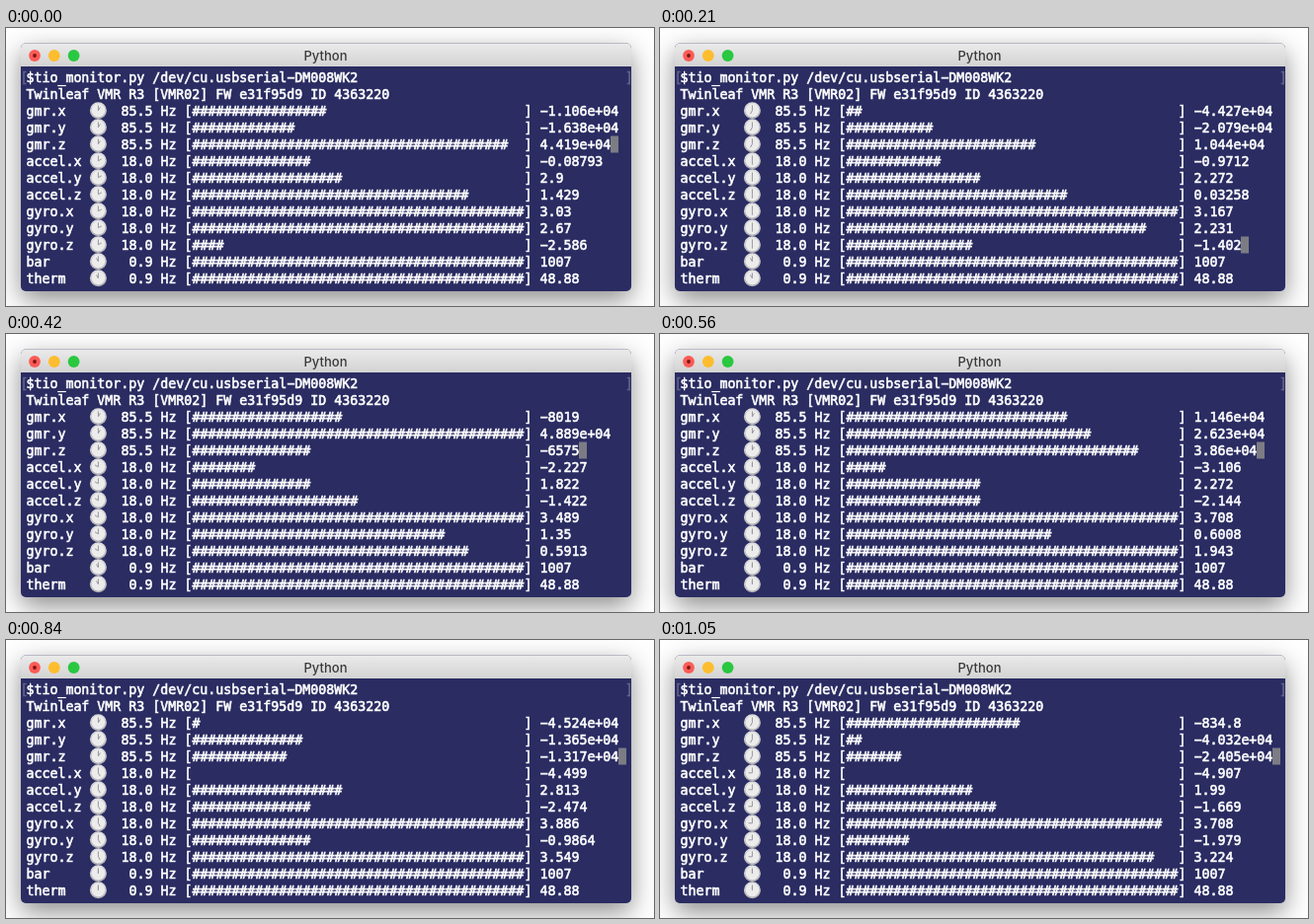
An HTML page with a canvas for the animation above (1120 ms loop, 656 by 282 pixels).

```html
<!DOCTYPE html>
<html lang="en">
<head>
<meta charset="utf-8">
<title>Sensor monitor</title>
<style>
html, body { margin: 0; width: 100%; height: 100%; overflow: hidden; background: #fff; }
canvas { display: block; width: 656px; height: 282px; }
</style>
</head>
<body>
<canvas id="stage"></canvas>
<script>
const W = 656, H = 282, STEP = 70, STEPS = 16;
const CELL = 8, LINE = 17, LEFT = 20.4, TOP = 42, FULL = 42;
const MONO = '13.29px "DejaVu Sans Mono", monospace';

const canvas = document.getElementById('stage');
const ctx = canvas.getContext('2d');
const dpr = window.devicePixelRatio || 1;
canvas.width = W * dpr;
canvas.height = H * dpr;
ctx.scale(dpr, dpr);

// Slow motion: a cosine around mid, highest at step peak
const wave = (mid, amp, peak, period) =>
  s => mid + amp * Math.cos(2 * Math.PI * (s - peak) / period);

// Fast, irregular field: straight lines between a few readings
const turns = [0, 3, 6, 8, 10, 12, 15];
const path = (...v) => s => {
  let i = 0;
  while (i < turns.length - 2 && s >= turns[i + 1]) i++;
  return v[i] + (v[i + 1] - v[i]) * (s - turns[i]) / (turns[i + 1] - turns[i]);
};

const fixed = v => () => v;
const sensor = (name, rate, lo, hi, read) => ({ name, rate, lo, hi, read });

const sensors = [
  sensor('gmr.x', 85.5, -49500, 41500,
    path(-11060, -44270, -8019, 11460, -34120, -45240, -834.8)),
  sensor('gmr.y', 85.5, -45900, 48800,
    path(-16380, -20790, 48890, 26230, -5946, -13650, -40320)),
  sensor('gmr.z', 85.5, -39750, 47750,
    path(44190, 10440, -6575, 38600, 34670, -13170, -24050)),
  sensor('accel.x', 18, -4.76, 7.59, wave(-2.36, 2.55, -2.7, 36)),
  sensor('accel.y', 18, -2.82, 9.53, wave(2.35, 0.55, 0, 11)),
  sensor('accel.z', 18, -5.63, 2.77, wave(-0.12, 2.43, -4.2, 30)),
  sensor('gyro.x', 18, -1.85, 3, wave(3.46, 0.43, 11.5, 23)),
  sensor('gyro.y', 18, -3.1, 2.66, wave(0, 2.7, -1, 42)),
  sensor('gyro.z', 18, -3.1, 1.25, wave(0.45, 3.15, 12.8, 28)),
  sensor('bar', 0.9, 0, 1007, fixed(1007)),
  sensor('therm', 0.9, 0, 48.88, fixed(48.88))
];

// The scale of each bar widens to hold every reading so far.
function barLength(q, s) {
  let { lo, hi } = q;
  for (let k = 0; k <= s; k++) {
    lo = Math.min(lo, q.read(k));
    hi = Math.max(hi, q.read(k));
  }
  return Math.floor(FULL * (q.read(s) - lo) / (hi - lo));
}

// Four significant digits, like printf's %.4g
function format(v) {
  if (Math.abs(v) < 9999.5) return String(parseFloat(v.toPrecision(4)));
  const [m, e] = v.toExponential(3).split('e+');
  return parseFloat(m) + 'e+' + e.padStart(2, '0');
}

function hourAt(rate, s) {
  if (rate < 1) return s < 7 ? 11 : 12;
  const start = rate > 50 ? 1 : 2;
  return Math.round(start + rate * s * STEP / 1000) % 12;
}

function disc(x, y, r, fill) {
  ctx.beginPath();
  ctx.arc(x, y, r, 0, Math.PI * 2);
  ctx.fillStyle = fill;
  ctx.fill();
}

function write(text, col, row, color = '#fff') {
  const x = LEFT + col * CELL, y = TOP + row * LINE + 13;
  const wide = text.replace(/-/g, '\u2212');
  ctx.font = MONO;
  ctx.textAlign = 'left';
  ctx.fillStyle = ctx.strokeStyle = color;
  ctx.lineWidth = 0.6;
  ctx.fillText(wide, x, y);
  ctx.strokeText(wide, x, y);
}

function hand(x, y, hour, len) {
  const a = hour * Math.PI / 6;
  ctx.beginPath();
  ctx.moveTo(x, y);
  ctx.lineTo(x + Math.sin(a) * len, y - Math.cos(a) * len);
  ctx.strokeStyle = '#97979b';
  ctx.lineWidth = 1;
  ctx.stroke();
}

function clock(row, hour) {
  const x = 93.4, y = TOP + row * LINE + 7.8;
  const rim = ctx.createLinearGradient(0, y - 8, 0, y + 8);
  rim.addColorStop(0, '#dedee0');
  rim.addColorStop(1, '#b0b0b4');
  disc(x, y, 8.5, rim);
  disc(x, y, 6.8, '#ececec');
  hand(x, y, 0, 5.4);
  hand(x, y, hour, 3.9);
}

function drawWindow() {
  ctx.fillStyle = '#fff';
  ctx.fillRect(0, 0, W, H);

  ctx.save();
  ctx.shadowColor = 'rgba(0,0,0,0.45)';
  ctx.shadowBlur = 26 * dpr;
  ctx.shadowOffsetY = 9 * dpr;
  ctx.beginPath();
  ctx.roundRect(15, 15.5, 618, 251.5, 5);
  ctx.fillStyle = '#2a2c62';
  ctx.fill();
  ctx.restore();

  const bar = ctx.createLinearGradient(0, 15, 0, 39);
  bar.addColorStop(0, '#ebebeb');
  bar.addColorStop(1, '#d3d3d3');
  ctx.beginPath();
  ctx.roundRect(15, 15.5, 618, 23.5, [5, 5, 0, 0]);
  ctx.fillStyle = bar;
  ctx.fill();

  ['#fc5b57', '#fdbd2e', '#29c840'].forEach((c, i) => disc(29 + i * 19.8, 28, 5.9, c));
  disc(29, 28, 1.9, '#7d1512');

  ctx.font = '500 13px Inter, sans-serif';
  ctx.textAlign = 'center';
  ctx.fillStyle = '#3a3a3a';
  ctx.fillText('Python', 323.5, 32.5);
}

function draw(s) {
  drawWindow();
  write('[', -0.75, 0, '#5f618a');
  write(']', 75.8, 0, '#5f618a');
  write('$tio_monitor.py /dev/cu.usbserial-DM008WK2', 0, 0);
  write('Twinleaf VMR R3 [VMR02] FW e31f95d9 ID 4363220', 0, 1);

  const active = s % 7 === 3 ? 'gyro.z' : 'gmr.z';
  sensors.forEach((q, i) => {
    const row = i + 2, text = format(q.read(s));
    write(q.name, 0, row);
    clock(row, hourAt(q.rate, s));
    write(q.rate.toFixed(1).padStart(4) + ' Hz', 12, row);
    write('[' + '#'.repeat(barLength(q, s)), 20, row);
    write(']', 63, row);
    write(text, 65, row);
    if (q.name === active) {
      ctx.fillStyle = '#7c7c84';
      ctx.fillRect(20 + (65 + text.length) * CELL, TOP - 0.5 + row * LINE, CELL, LINE);
    }
  });
}

const begin = performance.now();
function tick() {
  const t = performance.now() - begin;
  draw(Math.floor(t / STEP) % STEPS);
  requestAnimationFrame(tick);
}
tick();
</script>
</body>
</html>
```
